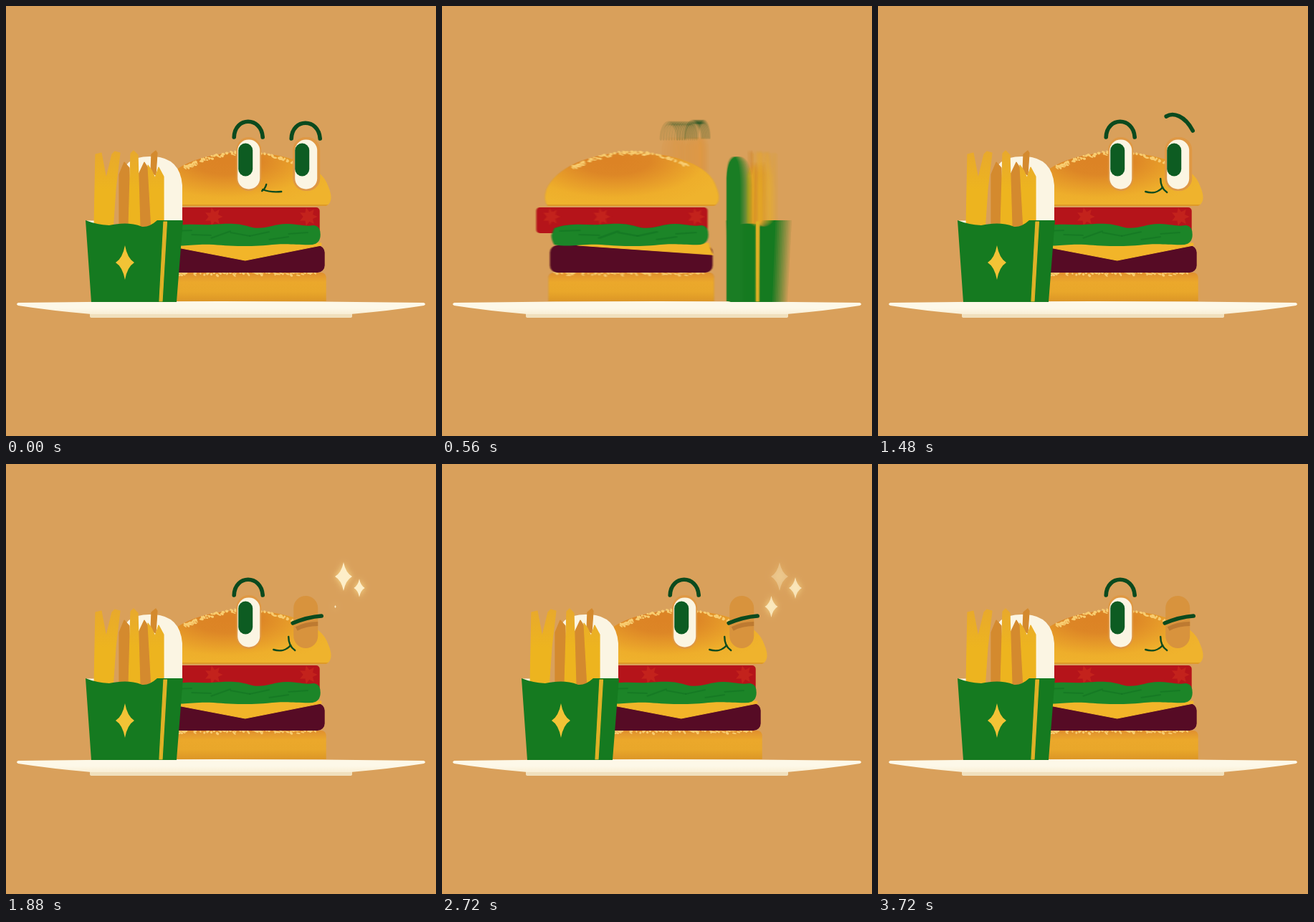
Animation, 600 px wide and 600 px high, one loop 3.76 s. Source, as an HTML page with a canvas:

```html
<!DOCTYPE html>
<html lang="en">
<head>
<meta charset="utf-8">
<title>Burger and fries</title>
<style>
html, body { margin: 0; width: 100%; height: 100%; overflow: hidden; background: #d9a05b; }
canvas { display: block; width: 600px; height: 600px; }
</style>
</head>
<body>
<canvas id="stage" width="600" height="600"></canvas>
<script>
const LOOP = 3760, STEP = 40, SIZE = 600;
const SPIN_START = 0, SPIN_END = 946;
const INK = '#0b4a1e', GREEN = '#157a20', YELLOW = '#edb41f', CREAM = '#fbf5e3';

const stage = document.getElementById('stage').getContext('2d');
const layer = document.createElement('canvas');
layer.width = layer.height = SIZE;
const g = layer.getContext('2d');

const clamp = v => Math.max(0, Math.min(1, v));
const progress = (t, from, to) => clamp((t - from) / (to - from));
const easeInOut = p => p < .5 ? 2 * p * p : 1 - 2 * (1 - p) ** 2;
const smooth = (t, from, to) => { const p = progress(t, from, to); return p * p * (3 - 2 * p); };
const mix = (a, b, p) => a.map((v, i) => v + (b[i] - v) * p);

function randomizer(seed) {
  return () => (seed = (seed * 16807) % 2147483647) / 2147483647;
}

function fill(path, color) {
  g.fillStyle = color;
  g.fill(new Path2D(path));
}

function polygon(points, color) {
  g.beginPath();
  for (let i = 0; i < points.length; i += 2) g.lineTo(points[i], points[i + 1]);
  g.closePath();
  g.fillStyle = g.strokeStyle = color;
  g.lineWidth = 1.2;
  g.lineJoin = 'round';
  g.fill();
  g.stroke();
}

function pill(x, y, w, h, r, color) {
  g.beginPath();
  g.roundRect(x, y, w, h, r);
  g.fillStyle = color;
  g.fill();
}

function curve(p, width) {
  g.beginPath();
  g.moveTo(p[0], p[1]);
  g.bezierCurveTo(...p.slice(2));
  g.strokeStyle = INK;
  g.lineWidth = width;
  g.lineCap = 'round';
  g.stroke();
}

function at(x, scale, draw) {
  g.save();
  g.translate(x, 0);
  g.scale(scale, 1);
  draw();
  g.restore();
}

function blend(paint, colors) {
  colors.forEach((c, i) => paint.addColorStop(i / (colors.length - 1), c));
  return paint;
}

const gradient = (y0, y1, ...colors) => blend(g.createLinearGradient(0, y0, 0, y1), colors);

function star(x, y, rx, ry, color) {
  g.beginPath();
  g.moveTo(x, y - ry);
  [[1, 0], [0, 1], [-1, 0], [0, -1]].forEach(([dx, dy], i) => {
    const sx = i < 2 ? 1 : -1, sy = i % 3 ? 1 : -1;
    g.quadraticCurveTo(x + sx * rx * .25, y + sy * ry * .25, x + dx * rx, y + dy * ry);
  });
  g.fillStyle = color;
  g.fill();
}

function speckles(seed, count, from, to, edge) {
  const random = randomizer(seed);
  g.fillStyle = '#f8cc70';
  for (let i = 0; i < count; i++) {
    const x = from + (to - from) * random();
    g.beginPath();
    g.ellipse(x, edge(x) + 5 * random() ** 2, 1 + 2.2 * random(), .8 + random(), random(), 0, 7);
    g.fill();
  }
}

function drawPlate() {
  fill('M117 427H483V433Q483 435 480 435H120Q117 435 117 433Z', '#f1e0bd');
  fill('M17 414Q300 410 583 414Q587 416 583 418Q538 425 481 430H119Q62 425 17 418Q13 416 17 414Z',
    gradient(412, 431, '#fdf8e8', '#fdf8e8', '#f8edd2'));
}

// Cheese: a corner that hangs toward the viewer and travels around the stack.
function drawCheese(angle) {
  const c = Math.cos(angle), s = Math.sin(angle);
  const tip = c > 0 ? 2 + 111 * s : 113 * Math.sign(s || 1);
  const drop = 333 + 16.7 + 5.3 * c;
  const left = c > 0 ? -108 : s > 0 ? -75 : -113, right = c > 0 || s > 0 ? 108 : 75;
  polygon([left, 331, right, 331, right, 334, tip, drop, left, 334], '#f2b529');
}

function drawStack(angle) {
  fill('M-116 380Q-116 372 -108 372H108Q115 372 115 380V412H-116Z',
    gradient(372, 412, '#e0902f', '#eba82b', '#e9a72a', '#dc9626'));
  speckles(11, 90, -108, 110, () => 371);
  pill(-114, 334, 227, 38, 10, '#560b25');
  drawCheese(angle);

  pill(-133, 281, 239, 36, 5, '#b5141a');
  g.fillStyle = 'rgba(222,60,35,.35)';
  for (const x of [-112, -42, 90]) {
    g.beginPath();
    for (let i = 0; i < 14; i++) {
      const a = i * Math.PI / 7, r = i % 2 ? 7 : 13;
      g.lineTo(x + r * Math.cos(a), 294 + r * Math.sin(a));
    }
    g.fill();
  }
  fill('M-108 310C-85 302 -65 306 -45 305S-12 302 8 308S42 303 62 304S83 308 98 306Q107 307 107 319Q107 331 96 333C72 334 60 331 40 333S12 335 -8 335S-42 332 -62 333S-93 336 -108 333Q-112 326 -112 320Z',
    '#1c8528');
  g.strokeStyle = 'rgba(10,100,30,.3)';
  g.lineWidth = 2;
  for (let i = 0; i < 7; i++) {
    g.beginPath();
    g.moveTo(-100 + i * 27, 314 + i * 5 % 13);
    g.lineTo(-72 + i * 27, 313 + i * 7 % 13);
    g.stroke();
  }
}

function drawBun() {
  g.save();
  g.clip(new Path2D('M-117 279Q-124 271 -119 256C-105 225 -60 205 0 204C60 205 109 222 118 252Q127 273 115 279Z'));
  g.scale(2.4, 1);
  g.fillStyle = blend(g.createRadialGradient(-10, 215, 4, -10, 215, 68), ['#dc8325', '#dd8626', '#e69a29', '#eeae2b', '#efb32d']);
  g.fillRect(-60, 200, 120, 82);
  g.fillStyle = 'rgba(213,139,36,.6)';
  g.fillRect(-60, 277, 120, 3);
  g.restore();
  speckles(5, 110, -82, 80, x => 203 + x * x * .0031);
}

function drawSocket(right) {
  pill(right ? -18 : -17, 183, right ? 38 : 35, 75, 18, '#df9844');
}

function drawLid() {
  pill(-17, 184, 34, 73, 17, '#d8933d');
}

function drawCrease() {
  g.beginPath();
  g.moveTo(-13, 230);
  g.quadraticCurveTo(0, 223, 17, 223);
  g.strokeStyle = '#bd7a31';
  g.lineWidth = 6;
  g.lineCap = 'butt';
  g.stroke();
}

function drawEye(right, wink) {
  if (right && wink === 1) {
    drawLid();
    drawCrease();
    return;
  }
  drawSocket(right);
  pill(-15, 186.5, 31, 69, 15, CREAM);
  pill(right ? -15 : -14, 191.5, 20, 46, 10, '#0d5c22');
  if (right && wink > 0) {
    g.save();
    g.beginPath();
    g.rect(-20, 180, 42, 78 * wink);
    g.clip();
    drawLid();
    g.restore();
  }
}

const BROW = [-20, 183, -19, 154, 18, 154, 20, 183];
const BROW_RAISED = [-16, 154, -6, 148, 10, 153, 21, 174];
const BROW_WINK = [-18, 222, -6, 217, 8, 213, 22, 212];

function drawBrow(right, t) {
  let shape = BROW;
  if (right) {
    shape = mix(BROW.map((v, i) => i % 2 ? v + 2 : v), BROW_RAISED, smooth(t, 1240, 1480));
    shape = mix(shape, BROW_WINK, smooth(t, 1500, 1640));
  }
  curve(shape, 5.6);
}

function drawMouth(t) {
  const p = smooth(t, 1120, 1320);
  curve(mix([-11, 256, -4, 259, 5, 260, 15, 259], [4, 259, 13, 262, 22, 260, 28, 253], p), 2.4);
  curve(mix([-6, 249, -7, 253, -9, 256, -12, 258], [25, 241, 25, 249, 28, 256, 34, 260], p), 2.4);
}

const EYES = [{ offset: 6.5, depth: 112, right: false }, { offset: 86.5, depth: 128, right: true }];

// Each facial part sits on the front of the bun and orbits with it.
function drawFace(angle, t, front) {
  const c = Math.cos(angle), s = Math.sin(angle);
  const part = (offset, depth, draw) => {
    if ((depth * c - offset * s > 0) !== front) return;
    at(offset * c + depth * s, Math.max(.3, Math.abs(c)), draw);
  };
  for (const { offset, depth, right } of EYES) part(offset, depth, () => {
    if (front) drawEye(right, progress(t, 1520, 1620)); else drawSocket(right);
    drawBrow(right, t);
  });
  if (front) part(37.5, 112, () => drawMouth(t));
}

function drawBurger(angle, orbit, t) {
  at(300 - 39 * Math.sin(orbit), 1, () => {
    drawFace(angle, t, false);
    drawStack(angle);
    drawBun();
    drawFace(angle, t, true);
  });
}

function drawPotatoes() {
  const dark = '#d48a2e', light = gradient(203, 308, '#e8a92c', YELLOW, YELLOW);
  polygon([-17, 235, -10, 218, -3, 226, -1, 310, -17, 310], dark);
  polygon([10, 235, 18, 218, 27, 232, 29, 310, 10, 310], dark);
  polygon([28, 207, 34, 202, 36, 205, 34, 236, 27, 232], dark);
  polygon([-50, 207, -42, 205, -35, 242, -30, 312, -52, 312], light);
  polygon([-27, 207, -23, 203, -16, 205, -22, 255, -26, 312, -44, 312, -40, 255, -35, 240], light);
  polygon([-1, 206, 3, 202, 9, 208, 12, 312, -4, 312], light);
  polygon([23, 222, 28, 229, 33, 240, 38, 225, 45, 238, 45, 302, 28, 310], light);
}

function drawFries(angle, orbit) {
  const c = Math.cos(angle), s = Math.sin(angle);
  const turn = Math.abs(c) ** 1.6;
  const wide = turn + 20 / 66 * Math.abs(s);
  const card = () => at(26 * c - 14 * s, Math.max(turn, .08), () =>
    fill(`M-43 ${c > 0 ? 310 : 412}V240Q-40 210 -4 210H2Q39 212 42 250V${c > 0 ? 300 : 412}Z`, c > 0 ? CREAM : '#1a7d24'));
  const box = () => {
    at(0, wide, () => fill('M-67 299Q-52 305 -34 306C-18 303 -4 302 12 308Q22 309 33 299H69L60 413H-59Z', GREEN));
    at(44 * c + 30 * s, 1, () => polygon([-2, 301, 2.5, 301, -4 * c, 412, -4 - 4 * c, 412], '#dfb126'));
    if (c > .1) at(-12 * c + 20 * s, turn, () => star(0, 358, 13, 24, '#f2c336'));
  };
  at(300 + 150 * Math.sin(orbit), 1, () => {
    if (c > 0) {
      card();
      at(0, wide, () => polygon([-65, 300, -44, 300, -44, 306, -60, 305], CREAM));
    }
    at(-3 * c + 4 * s, (c < 0 ? -1 : 1) * Math.max(turn, .12), drawPotatoes);
    box();
    if (c <= 0) card();
  });
}

const SPARKLES = [[471, 157, 12, 20, 1680, 2590], [493, 173, 9, 15, 1760, 2680], [459.5, 199, 9, 15, 1840, 2690]];

function drawSparkles(t) {
  for (const [x, y, rx, ry, start, end] of SPARKLES) {
    const size = smooth(t, start, start + 160), alpha = 1 - progress(t, end, end + 200);
    if (!size || !alpha) continue;
    g.save();
    g.globalAlpha = alpha;
    g.shadowColor = 'rgba(255,228,150,.9)';
    g.shadowBlur = 9;
    star(x, y, rx * size, ry * size, '#fdeec8');
    g.restore();
  }
}

// The plate turns once, carrying the fries left, behind the burger and back round the right.
function drawScene(t) {
  const angle = -2 * Math.PI * (easeInOut(progress(t, SPIN_START, SPIN_END)) % 1);
  const orbit = angle - .95;
  g.fillStyle = '#d9a05b';
  g.fillRect(0, 0, SIZE, SIZE);
  drawPlate();
  const parts = [() => drawBurger(angle, orbit, t), () => drawFries(angle, orbit)];
  if (Math.cos(orbit) < 0) parts.reverse();
  parts.forEach(draw => draw());
  drawSparkles(t);
}

// Average several moments of the spin to get its motion blur.
function render(now) {
  const t = Math.floor(now % LOOP / STEP) * STEP;
  const samples = t > SPIN_START && t < SPIN_END ? 10 : 1;
  for (let i = 0; i < samples; i++) {
    drawScene(t + (i - (samples - 1) / 2) * 2);
    stage.globalAlpha = 1 / (i + 1);
    stage.drawImage(layer, 0, 0);
  }
}

let origin;
function tick(now) {
  origin ??= now;
  render(now - origin);
  requestAnimationFrame(tick);
}
render(0);
requestAnimationFrame(tick);
</script>
</body>
</html>
```
